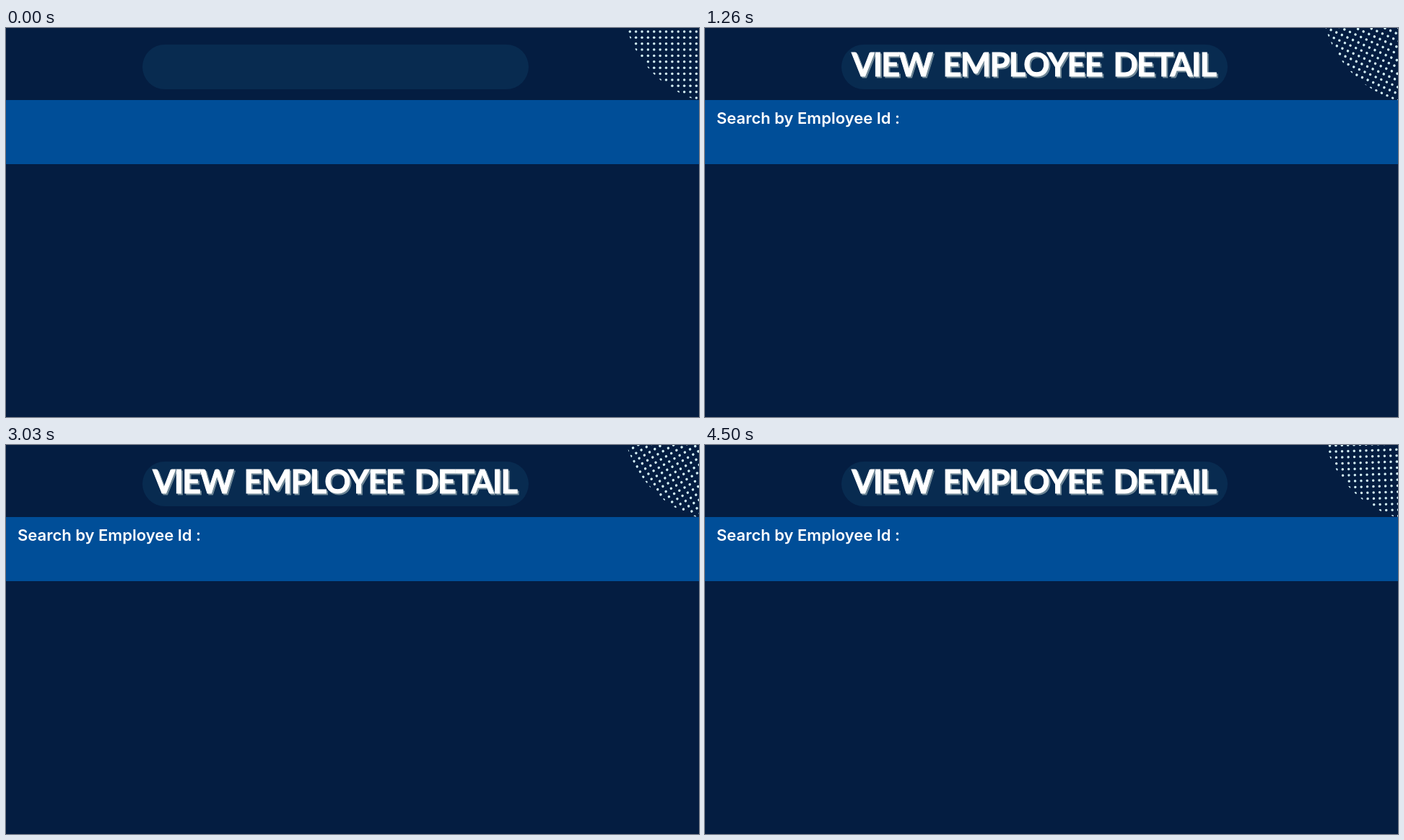
Recreate the animation shown at these times as an HTML page. Size 960 by 540 pixels, loop 4530 ms.

```html
<!DOCTYPE html>
<html lang="en">
<head>
<meta charset="utf-8">
<title>View employee detail</title>
<style>
  html, body { margin: 0; height: 100%; overflow: hidden; background: #041d41; }
  svg { display: block; width: 960px; height: 540px; }
  .title {
    font: 700 45px Lato, sans-serif; letter-spacing: -1.7px; word-spacing: 6.5px;
    text-anchor: middle; stroke-width: 1;
  }
  .label { font: 600 22px Inter, sans-serif; fill: #fff; }
</style>
</head>
<body>
<svg viewBox="0 0 960 540">
  <clipPath id="disc"><circle r="148.5"/></clipPath>
  <rect x="189" y="23" width="535" height="62" rx="31" fill="#082b50"/>
  <g transform="translate(1002.4 -41.1)">
    <g id="dots" clip-path="url(#disc)" fill="#d3eff5"></g>
  </g>
  <rect y="100" width="960" height="89" fill="#004e98"/>
  <g id="title" class="title">
    <text x="457.2" y="69.2" fill="#6f8796" stroke="#6f8796">VIEW EMPLOYEE DETAIL</text>
    <text x="455.2" y="67.2" fill="#fff" stroke="#fff">VIEW EMPLOYEE DETAIL</text>
  </g>
  <text id="label" class="label" x="16" y="133">Search by Employee Id :</text>
</svg>
<script>
  const LOOP = 4530, STEP = 30, POP = 860, SPIN = 0.0196;
  const PITCH = 8.37, RINGS = 17.5;
  const [dots, title, label] = ['dots', 'title', 'label'].map(id => document.getElementById(id));

  for (let i = -RINGS; i <= RINGS; i++) {
    for (let j = -RINGS; j <= RINGS; j++) {
      if (Math.hypot(i, j) > RINGS + 0.4) continue;
      const dot = document.createElementNS('http://www.w3.org/2000/svg', 'circle');
      dot.setAttribute('cx', i * PITCH);
      dot.setAttribute('cy', j * PITCH);
      dot.setAttribute('r', 1.75);
      dots.append(dot);
    }
  }

  // Ease out with a slight overshoot
  function backOut(p, s = 1.2) {
    const u = Math.min(p, 1) - 1;
    return 1 + (s + 1) * u ** 3 + s * u ** 2;
  }

  function scaleAbout(node, x, y, k) {
    node.setAttribute('transform', `translate(${x} ${y}) scale(${k}) translate(${-x} ${-y})`);
  }

  function draw(now) {
    const t = Math.floor((now % LOOP) / STEP) * STEP;
    const k = Math.max(0, backOut(t / POP));
    dots.setAttribute('transform', `rotate(${t * SPIN})`);
    scaleAbout(title, 456, 52, k);
    scaleAbout(label, 142, 125, k);
    requestAnimationFrame(draw);
  }
  draw(0);
</script>
</body>
</html>
```
